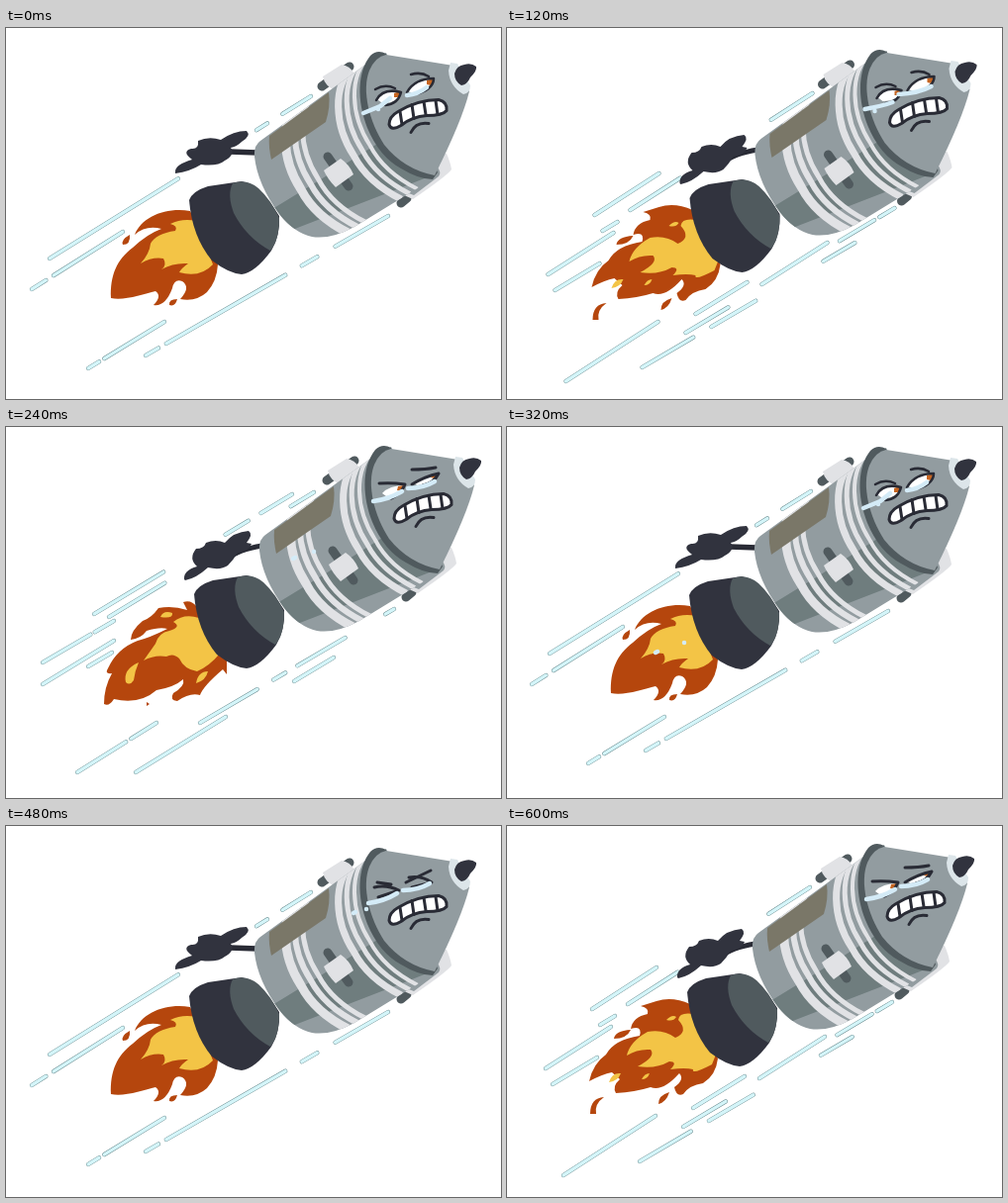
Animation of 500x375 px, one loop 0.64 s. Source, as an HTML page:

```html
<!DOCTYPE html>
<html lang="en">
<head>
<meta charset="utf-8">
<title>Rocket</title>
<style>
html, body { margin: 0; width: 100%; height: 100%; overflow: hidden; background: #fff; }
svg { display: block; width: 100vw; height: 100vh; }
.dark { fill: #31333e; }
.steel { fill: #505a5e; }
.gray { fill: #929ca0; }
.white { fill: #e1e2e5; }
.fire { fill: #b5460d; }
.gold { fill: #f3c446; }
.ink, .stub, .tear, .edge, .streak { fill: none; stroke-linecap: round; stroke-linejoin: round; }
.ink { stroke: #292b35; }
.stub { stroke: #505a5e; stroke-width: 9; }
.tear { stroke: #d4ebf7; stroke-width: 4.5; }
.edge { stroke: #64868a; stroke-width: 4.2; }
.streak { stroke: #d4f5f9; stroke-width: 3.3; }
</style>
</head>
<body>
<svg viewBox="0 0 500 375">
  <defs>
    <clipPath id="hull"><path d="M257 114L363 37L384 25L432 152L352 201Q328 214 309 211Q291 207 276 188Q254 158 251 130Q250 119 257 114Z"/></clipPath>
  </defs>
  <g id="rocket">
    <g id="streaks">
      <g>
        <path d="M44 233L308 69" stroke-dasharray="153 93 13 18 34"/>
        <path d="M26 264L118 206" stroke-dasharray="17 9 83"/>
        <path d="M83 344L160 297" stroke-dasharray="13 6 72"/>
        <path d="M141 331L386 190" stroke-dasharray="15 9 139 19 18 21 62"/>
      </g>
      <g>
        <path d="M84 194L284 73" stroke-dasharray="82 73 27 15 38"/>
        <path d="M99 197L306 71" stroke-dasharray="66 149 28"/>
        <path d="M32 243L104 201" stroke-dasharray="56 5 24"/>
        <path d="M67 354L147 304" stroke-dasharray="58 6 31"/>
        <path d="M191 304L387 189" stroke-dasharray="67 19 14 14 56 47 11"/>
        <path d="M32 265L104 221M78 247L102 233M126 354L217 298M286 262L326 238"/>
      </g>
      <g>
        <path d="M125 186L309 68" stroke-dasharray="60 109 50"/>
        <path d="M137 345L352 219" stroke-dasharray="60 21 52 79 37"/>
        <path d="M181 310L392 184" stroke-dasharray="50 131 41 6 19"/>
        <path d="M89 191L154 149M97 207L112 198M42 251L108 209M49 267L94 240M60 359L153 299M191 291L243 259M258 261L324 219"/>
      </g>
    </g>
    <g id="flames">
      <g>
        <path class="fire" d="M186 185C161 181 137 191 130 209Q141 199 157 203Q143 208 128 222C112 234 105 250 106 273C119 276 139 269 151 266Q158 271 149 280Q161 282 168 263Q170 253 178 256Q187 262 176 274Q192 277 203 267Q213 256 214 239ZM125 209Q116 214 118 219Q126 219 125 209ZM173 274Q164 274 165 280Q171 282 173 274Z"/>
        <path class="gold" d="M192 195Q178 192 166 198Q174 200 171 205Q151 208 146 218Q145 228 136 238Q148 231 159 233Q163 240 157 244Q169 237 184 238Q177 243 175 247Q196 253 209 239Z"/>
      </g>
      <g>
        <path class="fire" d="M188 187Q182 179 174 182L178 190Q163 185 149 188Q142 198 133 201Q121 211 121 220Q131 219 137 211Q150 207 158 209Q140 218 128 221Q107 229 98 249Q94 255 102 254Q94 268 94 285Q99 288 104 280Q130 286 147 271Q165 268 174 260Q176 267 164 274Q160 281 168 282Q181 273 191 276Q194 267 214 250L218 255L218 238ZM137 283L140 285L137 287Z"/>
        <path class="gold" d="M190 198Q175 193 164 202Q173 207 160 211Q149 213 146 224L134 241Q145 235 157 237Q164 233 170 239Q175 250 188 252Q200 247 211 234ZM151 197Q154 190 163 193Q164 199 151 197ZM116 263Q113 250 129 243Q125 252 124 261Q120 267 116 263ZM187 264Q189 252 199 252Q197 261 187 264Z"/>
      </g>
      <g transform="translate(3 6)">
        <path class="fire" d="M185 180Q167 172 151 177L135 182Q144 184 142 190Q127 193 125 205Q137 201 134 212Q108 216 100 231Q87 240 83 258Q96 251 106 249L114 256Q106 263 110 270Q129 269 145 264Q157 269 174 250Q180 256 169 264Q171 274 178 271Q184 262 198 260Q211 252 213 235ZM125 206Q109 207 108 215Q121 215 125 206ZM98 274Q84 275 84 291L90 291Q88 281 98 274ZM164 269Q153 272 153 281Q161 279 164 269Z"/>
        <path class="gold" d="M188 190Q174 188 173 196Q184 208 170 214Q158 205 142 208Q124 218 121 232Q132 225 145 226Q151 233 132 243Q150 246 164 238Q173 238 165 246Q180 244 188 246Q186 252 207 241L211 231ZM103 259Q106 249 115 250Q112 258 103 259ZM161 196Q167 190 171 193Q168 198 161 196ZM136 256Q139 250 144 250Q142 256 136 256Z"/>
      </g>
    </g>
    <g id="fins">
      <g>
        <path class="ink" stroke-width="5.5" d="M226 125L254 126"/>
        <path class="dark" d="M171 145Q171 138 188 133Q177 125 187 122Q195 123 194 114Q205 109 217 113Q230 104 243 104Q248 109 238 115Q233 120 227 121Q232 128 221 134Q214 140 197 138Q186 145 171 147Z"/>
      </g>
      <g>
        <path class="ink" stroke-width="5" d="M219 138Q229 129 254 125"/>
        <path class="dark" d="M175 159Q174 150 188 146Q179 138 187 128Q195 128 197 122Q207 118 216 122Q225 111 240 110Q245 113 238 122L243 123Q241 130 229 132Q225 139 219 145Q212 150 199 147Q187 158 176 160Z"/>
      </g>
    </g>
    <path class="stub" d="M319 59L347 39M399 177L405 172"/>
    <path class="white" d="M320 49L339 37Q347 38 352 46L333 63Q322 59 320 49Z"/>
    <path class="white" d="M433 128L445 127Q449 136 450 143Q446 149 411 173L402 169Z"/>
    <path class="gray" d="M436 141Q440 146 437 150L412 169L404 166Z"/>
    <path class="dark" d="M185 174Q188 165 204 160L238 155Q256 158 276 190Q277 210 268 225Q252 247 238 249Q225 248 208 235Q188 211 185 174Z"/>
    <path class="steel" d="M229 157Q243 152 255 162Q268 174 276 192Q276 215 267 225Q243 212 230 187Q223 168 229 157Z"/>
    <g clip-path="url(#hull)">
      <path class="gray" d="M240 20H440V220H240Z"/>
      <path fill="#6f7d7e" d="M269 183L318 153L375 117L445 110V143L395 163L284 206Z"/>
      <g id="rings" fill="none" stroke="#e1e2e5"></g>
      <path fill="#7a7768" d="M266 109L326 65Q328 79 323 95L268 133Q265 120 266 109Z"/>
    </g>
    <path class="stub" d="M325 130L346 160"/>
    <path class="white" d="M321 144L338 132Q347 138 351 148L333 161Q325 153 321 144Z"/>
    <path class="steel" d="M384 26Q375 21 368 28C355 44 354 73 365 101Q377 130 399 142Q417 153 431 153L436 146Z"/>
    <path class="gray" d="M384 27L452 38L468 64Q461 93 433 149Q402 143 382 118C367 95 359 63 367 43Q373 29 384 27Z"/>
    <path fill="#dce5e9" d="M449 35L456 36L469 58Q469 66 462 67Q448 59 447 43Z"/>
    <path class="dark" d="M453 46Q455 38 463 37Q470 35 475 39Q476 43 469 50Q466 57 460 58Q453 54 453 46Z"/>
    <g id="eyes" transform="translate(1 -2)">
      <g>
        <path fill="#fff" d="M374 74Q381 64 398 67Q395 78 379 78ZM405 66Q411 53 431 54Q428 65 410 68Z"/>
        <path fill="#c66521" d="M391 68L396 66Q399 68 396 72L391 72ZM424 55L430 53Q432 57 428 60L424 59Z"/>
        <path class="ink" stroke-width="2.5" d="M373 75Q380 62 398 67Q395 79 382 80M372 64Q382 58 392 63M404 67Q412 53 431 53Q431 63 416 68M408 49Q418 46 426 51"/>
      </g>
      <g>
        <path fill="#fff" d="M374 74Q381 66 397 66Q393 76 378 77ZM405 64Q413 56 431 55Q427 62 410 66Z"/>
        <path fill="#c66521" d="M390 67L396 66L393 72L389 71ZM425 55L431 54L427 59L423 58Z"/>
        <path class="ink" stroke-width="3" d="M371 64Q384 63 397 65Q393 75 383 79M404 65Q417 57 431 54Q426 64 415 66M404 50Q418 50 428 48"/>
      </g>
      <path class="ink" stroke-width="3" d="M371 66Q383 63 396 69L375 76M374 61L388 63M403 61L428 49M406 56Q419 54 429 61L409 66"/>
    </g>
    <g id="tears">
      <path class="tear" d="M361 86L378 79L388 71M405 68Q416 67 425 60M376 82V82"/>
      <path class="tear" d="M362 84Q379 81 390 77M396 69Q416 68 429 61M372 86V86"/>
      <path class="tear" d="M366 80Q382 78 395 70M401 67Q416 67 428 60"/>
    </g>
    <g id="drops">
      <path id="leadDrop" class="tear" d="M0 0L2 -1"/>
      <path id="lateDrop" class="tear" d="M0 0V0"/>
    </g>
    <g transform="translate(0 -1.5)">
      <path fill="#fff" stroke="#292b35" stroke-width="3" d="M387 99Q387 91 396 86Q416 74 437 74Q446 76 445 85Q441 90 425 90Q410 91 399 100Q389 106 387 99Z"/>
      <path class="ink" stroke-width="3" d="M398 86L400 99M410 79L412 93M422 76L424 89M434 75L436 89M409 107Q414 96 427 98"/>
    </g>
  </g>
</svg>
<script>
const $ = id => document.getElementById(id);
const STEP = 40, COUNT = 16;

// the same ring slides down the hull axis: distance from the rim, width
const rings = [[5, 4], [14, 5], [24, 7], [66, 5], [75, 6], [86, 9]];
$("rings").innerHTML = rings.map(([s, width]) =>
  `<path stroke-width="${width}" transform="translate(${-0.86 * s} ${0.55 * s})"
    d="M372 25C350 45 352 85 372 116Q386 143 420 160"/>`).join("");

// every streak gets a thin dark outline below its light core; the last gap hides repeats
for (const path of document.querySelectorAll("#streaks path")) {
  const dashes = path.getAttribute("stroke-dasharray");
  if (dashes) path.setAttribute("stroke-dasharray", dashes + " 999");
}
for (const set of $("streaks").children) {
  const lanes = set.innerHTML;
  set.innerHTML = `<g class="edge">${lanes}</g><g class="streak">${lanes}</g>`;
}

// shake: step, x, y
const shakeKeys = [[0, 0, 0], [2, 0, 0], [4, -1, -4], [6, 5, -5], [8, -1, -4], [12, 0, -2], [14, -1, 0], [15, -3, -6]];

function shake(i) {
  const k = Math.max(1, shakeKeys.findIndex(key => key[0] >= i));
  const [i0, x0, y0] = shakeKeys[k - 1], [i1, x1, y1] = shakeKeys[k];
  const p = (i - i0) / (i1 - i0);
  return [x0 + (x1 - x0) * p, y0 + (y1 - y0) * p];
}

function eyePose(i) {
  const fromShut = Math.abs(i - 12);
  if (fromShut <= 1) return 2;
  return fromShut <= 3 || i === 6 || i === 7 ? 1 : 0;
}

function show(id, active) {
  [...$(id).children].forEach((el, i) => el.style.display = i === active ? "" : "none");
}
function move(id, x, y) {
  $(id).setAttribute("transform", `translate(${x} ${y})`);
}

function draw(time) {
  const i = Math.floor(time / STEP) % COUNT;
  const beat = i % 4;
  const burn = beat % 2 ? 2 : beat / 2;
  move("rocket", ...shake(i));
  show("streaks", burn);
  show("flames", burn);
  show("fins", burn ? 1 : 0);
  move("streaks", beat === 1 ? -16 : 0, beat === 1 ? 2 : 0);
  show("eyes", eyePose(i));
  show("tears", i % 8 === 0 ? 0 : i % 8 < 4 ? 1 : 2);

  // teardrops accelerate backwards as the rocket leaves them behind
  const u = (i + 4) % 8 / 2;
  $("drops").style.display = i >= 4 && i <= 12 ? "" : "none";
  move("leadDrop", 351 - 32 * u - 34 * u * u, 90 + 25 * u + 23 * u * u);
  move("lateDrop", 364 - 24 * u - 34 * u * u, 86 + 22 * u + 23 * u * u);
}

const start = performance.now();
function tick() {
  draw(performance.now() - start);
  requestAnimationFrame(tick);
}
tick();
</script>
</body>
</html>
```
